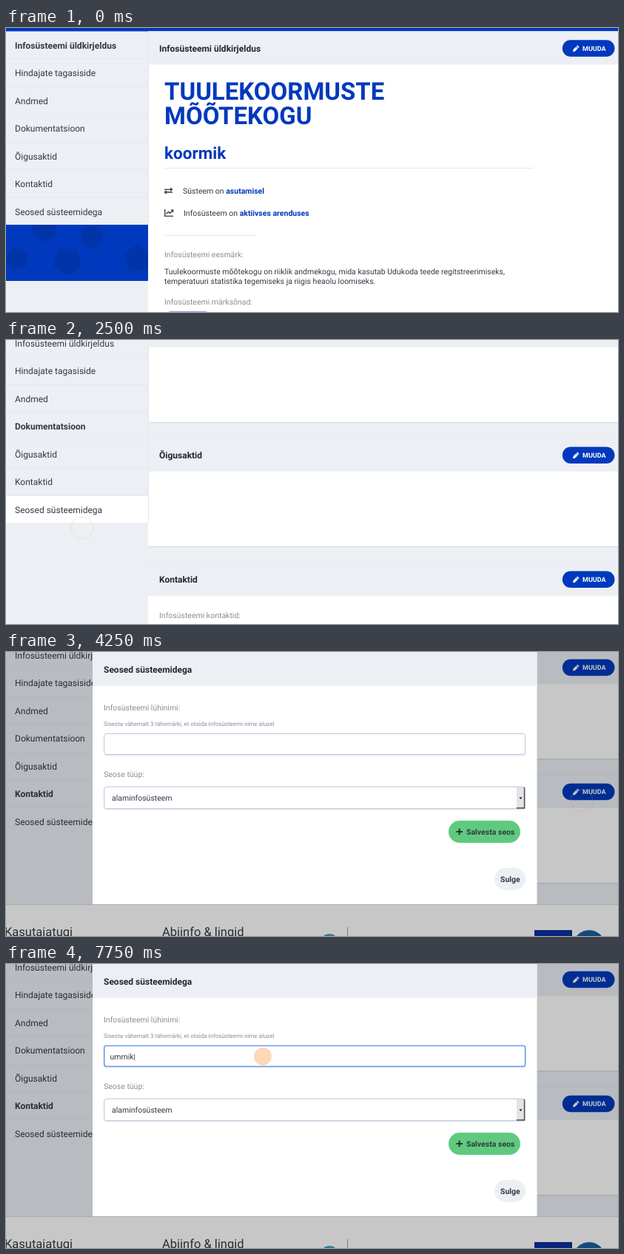
Write an HTML page that moves like this. It is 827 by 384 pixels and loops after 8 s.

```html
<!DOCTYPE html>
<html lang="et">
<head>
<meta charset="utf-8">
<title>Infosüsteemi kirjeldus</title>
<style>
  html, body { margin: 0; width: 100%; height: 100%; overflow: hidden; background: #eceff4; }
  svg { display: block; width: 827px; height: 384px; font: 10.5px Roboto, sans-serif; fill: #333a42; text-rendering: geometricPrecision; }
  .b { font-weight: 700; }
  .head { font-size: 12px; font-weight: 700; fill: #23272e; }
  .side { font-size: 12px; }
  .caps { font-size: 9px; font-weight: 700; fill: #fff; }
  .muted { fill: #8b8e93; }
  .hint { font-size: 8px; fill: #8b8e93; }
  .blue { fill: #0039bd; }
  .foot { font-size: 16.5px; }
  .line { stroke: #e6e8eb; fill: none; }
  .icon { stroke: #333a42; stroke-width: 1.3; fill: none; }
</style>
</head>
<body>
<svg id="stage" viewBox="0 0 827 384"></svg>
<script>
const LOOP = 8000, STEP = 250, SCROLL_END = 1500, SECTION = 168;
const BLUE = '#0039bd', PALE = '#eceff4';
const names = ['Infosüsteemi üldkirjeldus', 'Hindajate tagasiside', 'Andmed', 'Dokumentatsioon',
  'Õigusaktid', 'Kontaktid', 'Seosed süsteemidega'];
const tops = names.map((_, i) => i ? SCROLL_END - 2 + (i - 5) * SECTION : 4.5);

const text = (x, y, s, cls = '', more = '') => `<text x="${x}" y="${y}" class="${cls}" ${more}>${s}</text>`;
const rect = (x, y, w, h, fill, more = '') =>
  `<rect x="${x}" y="${y}" width="${w}" height="${h}" fill="${fill}" ${more}/>`;
const line = (x1, x2, y) => `<path class="line" d="M${x1} ${y}H${x2}"/>`;
const bold = (s, cls = '') => `<tspan class="b ${cls}">${s}</tspan>`;
const pentagon = (x, y, r, turn) => {
  const points = [0, 1, 2, 3, 4].map(i => {
    const a = turn + i * Math.PI * 0.4;
    return `${x + r * Math.cos(a)},${y + r * Math.sin(a)}`;
  });
  return `<polygon points="${points.join(' ')}" fill="#0034a8"/>`;
};

const editButton = top => rect(751.8, top + 11.7, 70.7, 22.6, BLUE, 'rx="11.3"') +
  `<path transform="translate(766 ${top + 27.5}) rotate(-45)" fill="#fff" d="M0 0L2.5-1.7H8V1.7H2.5ZM8.7-1.7H10.5V1.7H8.7Z"/>` +
  text(779, top + 26.2, 'MUUDA', 'caps');

const section = (i, bottom) => {
  const top = tops[i];
  return rect(192, bottom, 640, 1.5, '#d9dce2') + rect(192, top, 640, bottom - top, '#fff') +
    rect(192, top, 640, 45, PALE) + line(192, 827, top + 0.5) +
    text(207, top + 27.4, names[i], 'head') + editButton(top);
};

const overview = section(0, 804) +
  `<g class="b blue" font-size="33">${text(214, 96.5, 'TUULEKOORMUSTE')}${text(214, 129.5, 'MÕÕTEKOGU')}</g>` +
  text(214, 177, 'koormik', 'b blue', 'font-size="22.5"') + line(214, 712, 189.5) +
  '<path class="icon" d="M214 218.3H224M222 216.3L224.5 218.3L222 220.3M225 222H215M217 220L214.5 222L217 224"/>' +
  text(239, 223.7, 'Süsteem on ' + bold('asutamisel', 'blue')) +
  '<path class="icon" d="M214.7 245V254.3H226M216.5 251.5L219.5 248.5L221.5 250.5L225.5 246.5M223 246.2H225.7V249"/>' +
  text(240, 253.7, 'Infosüsteem on ' + bold('aktiivses arenduses', 'blue')) + line(214, 339, 280.5) +
  text(214, 310, 'Infosüsteemi eesmärk:', 'muted') +
  text(214, 332.5, 'Tuulekoormuste mõõtekogu on riiklik andmekogu, mida kasutab Udukoda teede regitstreerimiseks,') +
  text(214, 346, 'temperatuuri statistika tegemiseks ja riigis heaolu loomiseks.') +
  text(214, 374, 'Infosüsteemi märksõnad:', 'muted') +
  rect(211, 383.5, 69.5, 22.5, BLUE, 'rx="11.2"') + text(222, 398, 'RIIKLIK TEE', 'caps') +
  line(214, 339, 428.5) + text(214, 458, 'Omanik:', 'muted') +
  text(214, 481, 'Proovikoda', 'blue') + line(214, 339, 499.5) +
  '<circle class="icon" cx="219" cy="530" r="4.2" style="stroke-width:1"/>' + text(217, 533, '?', 'b', 'font-size="8"') +
  text(235, 534, 'Avalik kasutajaliides on ' + bold('määramata'));

const details = (i, label, value) =>
  text(207, tops[i] + 75, label, 'muted') + text(207, tops[i] + 97.5, value);

const footer = `<g transform="translate(0 ${SCROLL_END})">` +
  rect(0, 340.5, 827, 1.5, '#dcdfe5') + rect(0, 342, 827, 60, '#fff') +
  text(-2, 384, 'Kasutajatugi', 'foot') + text(211, 384, 'Abiinfo &amp; lingid', 'foot') +
  '<circle cx="437" cy="394" r="13" fill="#3d9ccc"/><path d="M461.5 372V400" stroke="#8fa6c4"/>' +
  rect(714, 376, 51, 34, '#0a2f9c') + '<circle cx="788" cy="398" r="22" fill="#1a5f9e"/></g>';

const page = rect(0, 0, 827, 342, BLUE) + pentagon(83, 315, 20, 0.3) + pentagon(178, 312, 20, 0.9) +
  pentagon(52, 272, 18, 0.5) + pentagon(116, 282, 17, 0.1) + pentagon(15, 312, 16, 0.7) +
  rect(0, 342, 827, 1800, PALE) + overview +
  [1, 2, 3, 4, 5, 6].map(i => section(i, tops[i] + 146)).join('') +
  details(5, 'Infosüsteemi kontaktid:', 'Kontaktid puuduvad.') +
  details(6, 'Infosüsteemi seosed:', 'Seosed teiste süsteemidega puuduvad') + footer;

const sidebar = rect(0, 4.5, 192, 261.5, PALE) +
  rect(0, 229.5, 192, 36.5, '#fff', 'id="hover"') +
  names.map((name, i) => text(12, 27.6 + 37.5 * i, name, 'side') + (i ? line(0, 192, 4 + 37.5 * i) : '')).join('') +
  '<path class="line" d="M192.5 4.5V266"/>';

const modal = rect(117, -1, 600.5, 342, '#fff') + rect(117, 0, 600.5, 46, PALE) +
  text(132, 27.6, names[6], 'head') +
  text(132, 79, 'Infosüsteemi lühinimi:', 'muted') +
  text(132, 100, 'Sisesta vähemalt 3 tähemärki, et otsida infosüsteemi nime alusel', 'hint') +
  rect(133, 112, 569, 28.5, '#e6e9f1', 'rx="3"') +
  rect(132.7, 110.5, 569, 28, '#fff', 'rx="3" id="field"') +
  text(140.5, 128.5, '', '', 'id="typed"') +
  text(132, 169, 'Seose tüüp:', 'muted') +
  rect(133, 184, 569, 29.5, '#e6e9f1', 'rx="3"') +
  rect(132.7, 182.3, 569, 29.5, '#fff', 'rx="3" stroke="#bcc5de"') +
  text(143, 201, 'alaminfosüsteem') + rect(690, 183, 11, 28, '#e3e3e3') +
  '<path d="M690 211H700.5V183" fill="none" stroke="#4a4a4a" stroke-width="1.3"/><path d="M693.3 196.5h4.4l-2.2 2.6z" fill="#111"/>' +
  rect(598, 228, 97, 30, '#5fca7e', 'rx="15"') +
  '<path d="M608.5 243H617M612.7 238.8V247.2" stroke="#23372a" stroke-width="2"/>' +
  text(622, 246.8, 'Salvesta seos', 'b') +
  rect(660, 292, 42, 30, PALE, 'rx="15"') + text(668, 310.8, 'Sulge', 'b');

const stage = document.getElementById('stage');
stage.innerHTML = `<g id="page">${page}</g><g id="sidebar">${sidebar}</g>
  <circle id="ring" r="15" fill="none" stroke="#f9b98a"/>
  <rect id="shade" width="827" height="384" fill="#000"/><g id="modal">${modal}</g>
  <circle id="dot" r="12" fill="#fca763"/>`;

const el = id => document.getElementById(id);
const set = (id, attrs) => { for (const k in attrs) el(id).setAttribute(k, attrs[k]); };
const sideLabels = [...el('sidebar').querySelectorAll('text')];

// Piecewise linear track of [time, ...values]
function track(keys, t) {
  const i = keys.findIndex(k => k[0] > t);
  if (i < 0) return keys[keys.length - 1].slice(1);
  if (i === 0) return keys[0].slice(1);
  const a = keys[i - 1], b = keys[i], p = (t - a[0]) / (b[0] - a[0]);
  return a.slice(1).map((v, n) => v + (b[n + 1] - v) * p);
}

const pointerPath = [[250, 172, 204], [1000, 80, 249], [1500, 80, 249], [2000, 103, 254], [3000, 103, 254],
  [3500, 785, 192], [3750, 785, 192], [4000, 778, 201], [4500, 778, 201], [5000, 440, 140], [5750, 347, 125]];
const dotAlpha = [[249, 0], [250, 0.45], [1750, 0.45], [2000, 0], [3000, 0], [3250, 0.45],
  [3750, 0.45], [4000, 0], [4250, 0], [4500, 0.45]];
const ringAlpha = [[1750, 0], [2000, 0.7], [2250, 0.6], [2750, 0.12], [3000, 0],
  [3750, 0], [4000, 0.6], [4250, 0.3], [4500, 0]];

function render(t) {
  const p = Math.min(1, Math.max(0, (t - 2148.3) / 500));
  const scroll = SCROLL_END * (0.5 - 0.5 * Math.cos(Math.PI * p));
  set('page', { transform: `translate(0 ${-scroll})` });
  set('sidebar', { transform: `translate(0 ${-Math.min(scroll, 18.7)})` });

  const active = tops.filter(top => top <= scroll + 50).length - 1;
  sideLabels.forEach((label, i) => label.classList.toggle('b', i === active));
  set('hover', { opacity: t >= 1500 && t < 3250 ? 1 : 0 });

  const [x, y] = track(pointerPath, t);
  set('dot', { cx: x, cy: y, opacity: track(dotAlpha, t)[0] });
  set('ring', { cx: x, cy: y, opacity: track(ringAlpha, t)[0] });

  const [open] = track([[3875, 0], [4125, 1]], t);
  set('shade', { opacity: 0.22 * open });
  set('modal', { opacity: open, transform: `translate(0 ${-30 * (1 - open)})` });

  const focused = t >= 6000;
  set('field', { stroke: focused ? '#6c97ef' : '#bcc5de', 'stroke-width': focused ? 1.6 : 1 });
  const count = Math.max(0, Math.floor((t - 6500) / 250));
  el('typed').textContent = count ? 'ummik'.slice(0, count) + '|' : '';
}

function frame(now) {
  render(Math.floor(now % LOOP / STEP) * STEP);
  requestAnimationFrame(frame);
}
requestAnimationFrame(frame);
</script>
</body>
</html>
```
